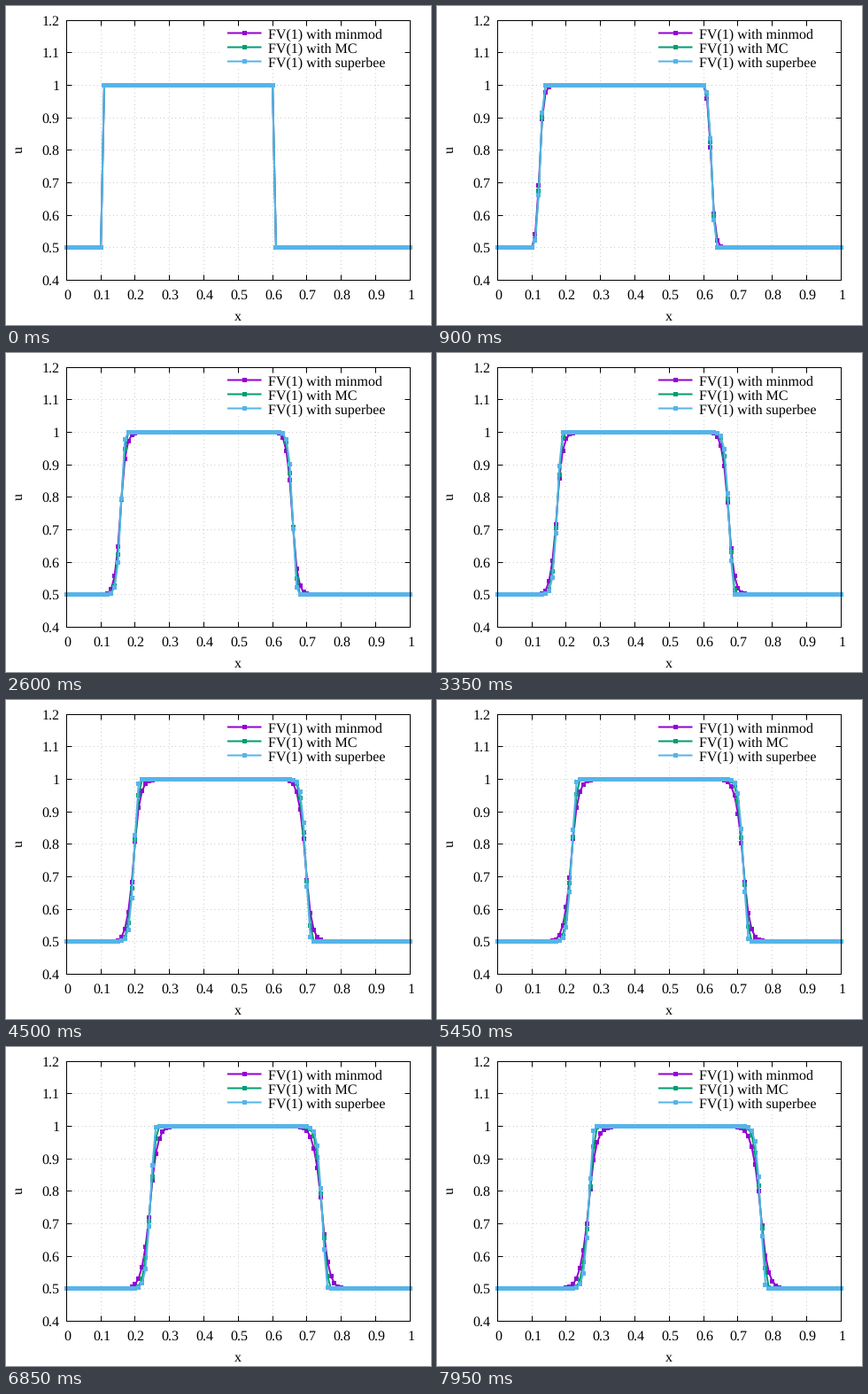
A matplotlib script for the animation above (8 s loop, 480 by 360 pixels).

```python
import matplotlib.pyplot as plt
import numpy as np
from matplotlib.animation import FuncAnimation
from matplotlib.collections import PolyCollection

W, H, DPI = 480, 360, 80
PX = 72 / DPI                      # points per pixel
LEFT, RIGHT, TOP, BOTTOM = 68.3, 456.3, 16.3, 309.3
KEY = (242, 22.5, 448, 70.5)       # legend area kept free of grid lines
TICK = 6
FRAMES, INTERVAL = 160, 50
CFL = 0.1                          # cells travelled per frame

plt.rcParams["font.family"] = "Liberation Serif"
plt.rcParams["font.size"] = 16 * PX
plt.rcParams["text.hinting"] = "none"


def minmod(a, b):
    return np.where(a * b > 0, np.sign(a) * np.minimum(abs(a), abs(b)), 0)


def mc(a, b):
    return minmod(2 * minmod(a, b), (a + b) / 2)


def superbee(a, b):
    p, q = minmod(2 * a, b), minmod(a, 2 * b)
    return np.where(abs(p) > abs(q), p, q)


def rate(u, limiter):
    """Upwind finite volume update with limited linear reconstruction."""
    v = np.pad(u, 2, mode="edge")
    d = np.diff(v)
    face = v[1:-1] + limiter(d[:-1], d[1:]) / 2
    return -CFL * np.diff(face)[:u.size]


def solve(limiter):
    i = np.arange(101)
    u = np.where((i > 10) & (i <= 60), 1.0, 0.5)
    states = [u]
    for _ in range(FRAMES - 1):
        u1 = u + rate(u, limiter)
        u = (u + u1 + rate(u1, limiter)) / 2
        states.append(u)
    return states


def to_x(x):
    return LEFT + x * (RIGHT - LEFT)


def to_y(u):
    return BOTTOM - (u - 0.4) / 0.8 * (BOTTOM - TOP)


def snap(v):
    """Centre of the pixel that holds v."""
    return np.floor(v) + 0.5


def squares(x, y, r=2.5):
    corners = np.array([(-r, -r), (r, -r), (r, r), (-r, r)])
    return snap(np.column_stack([x, y]))[:, None, :] + corners


fig = plt.figure(figsize=(W / DPI, H / DPI), dpi=DPI, facecolor="white")
ax = fig.add_axes([0, 0, 1, 1])
ax.set_xlim(0, W)
ax.set_ylim(H, 0)
ax.axis("off")


def line(x, y, color="black", width=1, **kw):
    return ax.plot(x, y, color=color, lw=width * PX, snap=False,
                   solid_capstyle="butt", solid_joinstyle="miter", **kw)[0]


def grid(x, y):
    # dash lengths are multiples of the line width
    line(x, y, width=0.5, dashes=(0.8, 8), dash_capstyle="butt", zorder=1)


def label(x, y, s, **kw):
    ax.text(x, y, s, **{"va": "baseline", **kw})


def series(x, y, color, z):
    path = line(x, y, color, 2, zorder=z)
    marks = PolyCollection(squares(x, y), facecolor=color, lw=0, zorder=z + 0.5)
    marks.set_snap(False)
    ax.add_collection(marks, autolim=False)
    return path, marks


# Grid, ticks and tick labels
x0, x1, y0, y1 = snap(np.array([LEFT, RIGHT, BOTTOM, TOP]))
for k in range(11):
    x = snap(to_x(k / 10))
    if 0 < k < 10:
        if KEY[0] < x < KEY[2]:
            grid([x, x], [y0, KEY[3]])
            grid([x, x], [KEY[1], y1])
        else:
            grid([x, x], [y0, y1])
    line([x, x], [y0, y0 - TICK], zorder=2)
    line([x, x], [y1, y1 + TICK], zorder=2)
    label(to_x(k / 10) + 0.9, 331, f"{k / 10:g}", ha="center")
for k in range(9):
    u = 0.4 + k / 10
    y = snap(to_y(u))
    if 0 < k < 8:
        if KEY[1] < y < KEY[3]:
            grid([x0, KEY[0]], [y, y])
            grid([KEY[2], x1], [y, y])
        else:
            grid([x0, x1], [y, y])
    line([x0, x0 + TICK], [y, y], zorder=2)
    line([x1, x1 - TICK], [y, y], zorder=2)
    label(60.5, y + 5.5, f"{u:g}", ha="right")
label(262, 355, "x", ha="center")
label(14.5, 162.5, "u", ha="center", va="center", rotation=90)

# Curves and legend
CURVES = [("minmod", minmod, "#9400d3"), ("MC", mc, "#009e73"),
          ("superbee", superbee, "#56b4e9")]
xs = to_x(np.linspace(0, 1, 101))
history, artists = [], []
for n, (name, limiter, color) in enumerate(CURVES):
    row = 30.5 + 16 * n
    sample, mark = series([250, 288.5], [row, row], color, 3 + n)
    mark.set_verts(squares([269.5], [row]))
    label(296, row + 6, f"FV(1) with {name}")
    history.append(solve(limiter))
    artists.append(series(xs, to_y(history[n][0]), color, 3 + n))

line([x0, x1, x1, x0, x0, x1], [y1, y1, y0, y0, y1, y1], zorder=10)


def update(frame):
    for states, (path, marks) in zip(history, artists):
        y = to_y(states[frame])
        path.set_ydata(y)
        marks.set_verts(squares(xs, y))
    return [a for pair in artists for a in pair]


anim = FuncAnimation(fig, update, frames=FRAMES, interval=INTERVAL, repeat=True)
plt.show()
```
